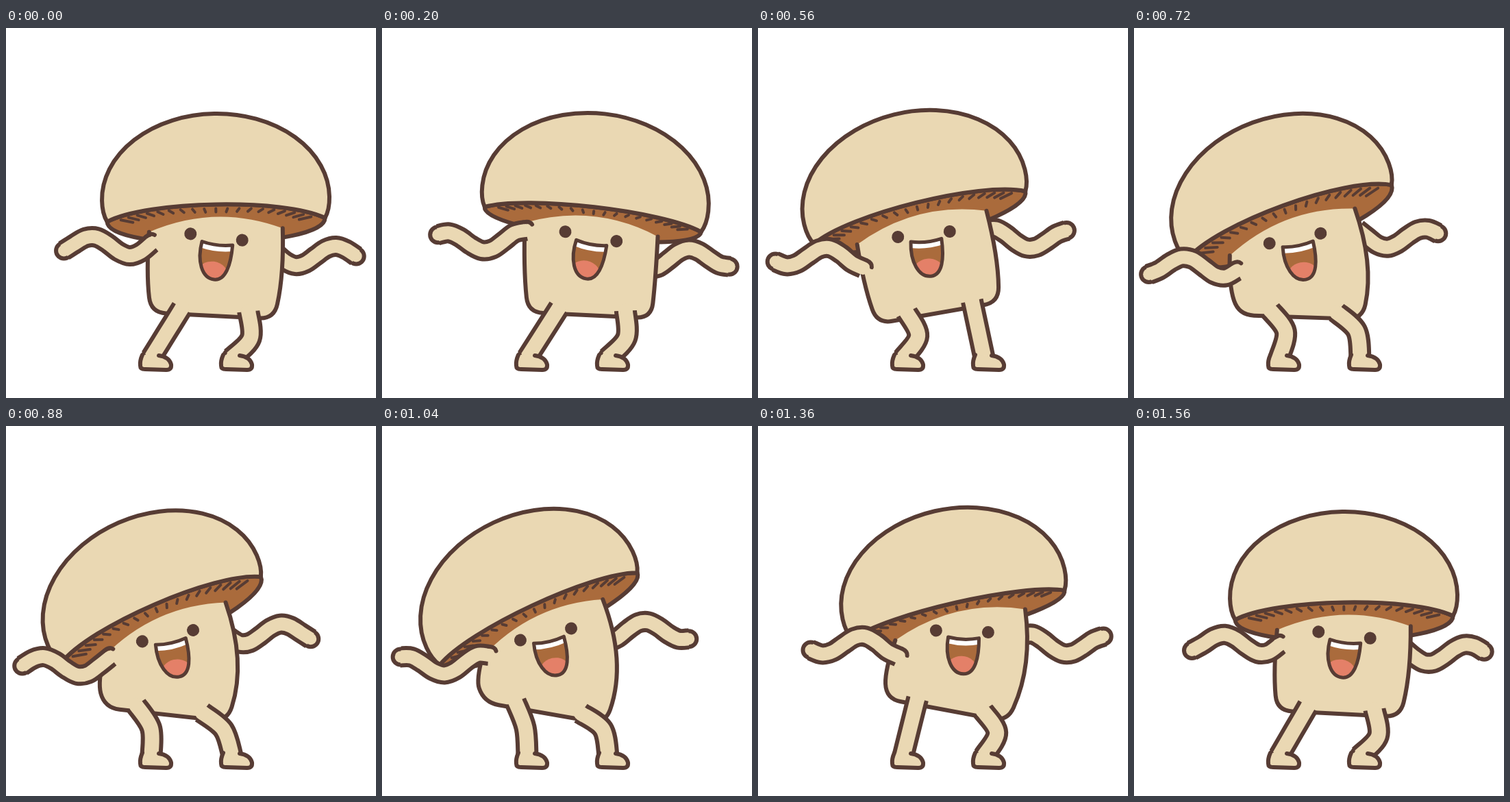
Write an HTML page with a canvas that moves like this. It is 540 px wide and 540 px high and loops after 1.6 s.

```html
<!DOCTYPE html>
<html lang="en">
<head>
<meta charset="utf-8">
<title>Dancing mushroom</title>
<style>
html, body { margin: 0; width: 100%; height: 100%; overflow: hidden; background: #fff; }
canvas { display: block; width: 540px; height: 540px; }
</style>
</head>
<body>
<canvas id="stage" width="540" height="540"></canvas>
<script>
const ctx = document.getElementById('stage').getContext('2d');
const INK = '#573c34', SKIN = '#ead8b3', GILL = '#aa6b3c', TONGUE = '#e48068';
const LOOP = 1600, STEP = 40, TURN = 2 * Math.PI;

// Time, face x and y, tilt of face, cap and hips in degrees, gill depth
const KEYS = [
  [0, 307, 305, 7, -1, 3, 45],
  [360, 300, 303, 13, 12, 2, 30],
  [560, 242, 301, -6, -14, -10, 45],
  [720, 235, 307, -11, -20, 2, 52],
  [1040, 239, 304, -13, -25, 10, 43],
  [1200, 281, 296, -5, -23, 16, 30],
  [1560, 307, 305, 7, -1, 3, 45]
];

// Periodic monotone cubic interpolation of one column of KEYS
function track(col, t) {
  const n = KEYS.length;
  const key = k => KEYS[(k + n) % n];
  const span = k => (key(k + 1)[0] - key(k)[0] + LOOP) % LOOP;
  const rate = k => (key(k + 1)[col] - key(k)[col]) / span(k);
  const slope = k => {
    const a = rate(k - 1), b = rate(k), h = span(k - 1), j = span(k);
    return a * b <= 0 ? 0 : 3 * (h + j) / ((2 * j + h) / a + (j + 2 * h) / b);
  };
  const i = KEYS.findLastIndex(k => k[0] <= t);
  const h = span(i), u = (t - key(i)[0]) / h, v = 1 - u;
  return v * v * (1 + 2 * u) * key(i)[col] + u * u * (3 - 2 * u) * key(i + 1)[col]
    + h * u * v * (v * slope(i) - u * slope(i + 1));
}

const add = (p, q, s = 1) => [p[0] + q[0] * s, p[1] + q[1] * s];
const sub = (p, q) => add(p, q, -1);
const mix = (p, q, s) => add(p, sub(q, p), s);
const unit = v => { const d = Math.hypot(...v) || 1; return [v[0] / d, v[1] / d]; };
const toward = (p, q, d) => add(p, unit(sub(q, p)), d);

// A rotated frame: maps local points to the stage, or draws in local space
function frame(origin, angle) {
  const c = Math.cos(angle), s = Math.sin(angle);
  return {
    at: (x, y) => add(origin, [x * c - y * s, x * s + y * c]),
    draw(paint) {
      ctx.save();
      ctx.transform(c, s, -s, c, ...origin);
      paint();
      ctx.restore();
    }
  };
}

const move = p => ctx.moveTo(...p);
const line = p => ctx.lineTo(...p);
const quad = (c, p) => ctx.quadraticCurveTo(...c, ...p);
const cubic = (a, b, p) => ctx.bezierCurveTo(...a, ...b, ...p);

function fill(color, path) {
  ctx.beginPath();
  path();
  ctx.fillStyle = color;
  ctx.fill();
}
function stroke(path, width = 6, color = INK, cap = 'round') {
  ctx.beginPath();
  path();
  ctx.lineWidth = width;
  ctx.strokeStyle = color;
  ctx.lineCap = cap;
  ctx.stroke();
}
function shape(color, path) {
  fill(color, path);
  stroke(path);
}
const dot = (p, r, color) => fill(color, () => ctx.arc(...p, r, 0, TURN));

function spline(pts) {
  const at = k => pts[Math.max(0, Math.min(pts.length - 1, k))];
  move(pts[0]);
  for (let k = 0; k < pts.length - 1; k++) {
    cubic(add(at(k), sub(at(k + 1), at(k - 1)), 1 / 6),
      add(at(k + 1), sub(at(k + 2), at(k)), -1 / 6), at(k + 1));
  }
}
// Outlined tube, open at the first point and round at the last
function limb(pts, outer) {
  for (const [width, color] of [[outer, INK], [outer - 12, SKIN]]) {
    stroke(() => spline(pts), width, color, 'butt');
    dot(pts.at(-1), width / 2 - 1, color);
  }
  dot(pts[0], outer / 2 - 6, SKIN);
}

function drawCap(depth) {
  const half = 159, arch = -depth * 2 / 3;
  const rim = () => cubic([100, arch], [-100, arch], [-half, 0]);
  shape(GILL, () => {
    move([half, 0]);
    rim();
    cubic([-half, depth], [half, depth], [half, 0]);
  });

  const hub = [0, depth * .6], count = 19;
  for (let k = 0; k < count; k++) {
    const s = .05 + .9 * k / (count - 1), r = 1 - s, edge = Math.abs(r - s);
    const p = [half * (s ** 3 - r ** 3) + 300 * r * s * (s - r), 3 * arch * r * s];
    const start = toward(p, hub, 6 + 5 * edge);
    stroke(() => { move(start); line(toward(start, hub, (5 + 16 * edge ** 2) * depth / 45)); }, 4);
  }

  shape(SKIN, () => {
    move([-half, 0]);
    quad([-166, -12], [-166, -31]);
    ctx.ellipse(0, -31, 166, 124, 0, Math.PI, TURN);
    quad([166, -12], [half, 0]);
    rim();
    ctx.closePath();
  });
}

function drawBody(cap, hips, bend) {
  const R = 22;
  const topL = cap.at(-98, 16), topR = cap.at(97, 14);
  const lowL = hips.at(-90, 0), lowR = hips.at(90, 0);
  const sideL = add(mix(topL, lowL, .5), [-5 - 8 * bend, 0]);
  const sideR = add(mix(topR, lowR, .5), [5 + 46 * bend, 0]);
  const sides = () => {
    move(topL);
    quad(sideL, toward(lowL, sideL, R));
    quad(lowL, toward(lowL, lowR, R));
    line(toward(lowR, lowL, R));
    quad(lowR, toward(lowR, sideR, R));
    quad(sideR, topR);
  };
  fill(SKIN, () => { sides(); quad(cap.at(0, -24), topL); });
  stroke(sides);
}

function drawFace() {
  dot([-38, 0], 9, INK);
  dot([38, 0], 9, INK);
  const lip = () => { move([-20, 9]); quad([2, 14], [25, 9]); };
  const mouth = () => {
    lip();
    cubic([26, 38], [21, 62], [4, 62]);
    cubic([-14, 62], [-24, 38], [-20, 9]);
    ctx.closePath();
  };
  fill(GILL, mouth);
  ctx.save();
  ctx.clip();
  fill(TONGUE, () => ctx.ellipse(1, 56, 23, 20, 0, 0, TURN));
  stroke(lip, 18, '#fff');
  ctx.restore();
  stroke(mouth, 5);
}

// Two equal bones from a moving hip to a planted ankle, knee to the right
function drawLeg(hip, x) {
  const ankle = [x, 481], reach = sub(ankle, hip);
  const spare = Math.max(0, 82 ** 2 - Math.hypot(...reach) ** 2);
  const side = unit([reach[1], -reach[0]]);
  const knee = add(mix(hip, ankle, .5), side, .4 * Math.sqrt(spare));
  limb([hip, knee, ankle], 33);
  shape(SKIN, () => {
    move([x - 13, 477]);
    quad([x - 17, 486], [x - 16, 493]);
    quad([x - 16, 498], [x - 9, 498]);
    line([x + 22, 499]);
    quad([x + 30, 499], [x + 29, 491]);
    quad([x + 26, 480], [x + 11, 478]);
  });
}

// Points of an arm carrying a wave; dir is -1 for left and 1 for right
function arm(shoulder, dir, length, crest) {
  return Array.from({ length: 9 }, (_, k) => {
    const u = length * k / 8;
    const lift = 16 * (1 - .002 * u) * Math.cos(TURN * (u - crest) / 112);
    return add(shoulder, [dir * u, -lift - 2]);
  });
}

function drawShoulder(pts) {
  const dir = unit(sub(pts[0], pts[1])), up = [dir[1], -dir[0]];
  const edge = add(pts[0], up, 12.5);
  stroke(() => {
    move(edge);
    quad(add(edge, dir, 9), add(add(edge, dir, 11), up, -6));
  });
}

function draw(t) {
  const [x, y, faceTilt, capTilt, hipTilt, depth] = [1, 2, 3, 4, 5, 6].map(c => track(c, t));
  const rad = a => a * Math.PI / 180;
  const face = frame([x, y], rad(faceTilt));
  const cap = frame(frame([x, y], rad(capTilt)).at(0, -25), rad(capTilt));
  const sway = 269 + 36 * Math.cos(TURN * (t - 115) / LOOP);
  const hips = frame([sway, y + 115], rad(hipTilt));
  // The same wave runs leftwards through both arms, twice per loop
  const drift = .14 * t;
  const leftArm = arm(face.at(-92, 26), -1, 128, 88 + drift);
  const rightArm = arm(face.at(89, 18), 1, 118, 88 - drift);

  ctx.fillStyle = '#fff';
  ctx.fillRect(0, 0, 540, 540);
  ctx.lineJoin = 'round';
  limb(rightArm, 31);
  cap.draw(() => drawCap(depth));
  drawBody(cap, hips, rad(hipTilt - capTilt));
  face.draw(drawFace);
  drawLeg(hips.at(-45, -9), 212);
  drawLeg(hips.at(52, -9), 330);
  limb(leftArm, 31);
  drawShoulder(leftArm);
}

const begin = performance.now();
function tick() {
  const elapsed = performance.now() - begin;
  draw(Math.floor(elapsed / STEP) * STEP % LOOP);
  requestAnimationFrame(tick);
}
tick();
</script>
</body>
</html>
```
